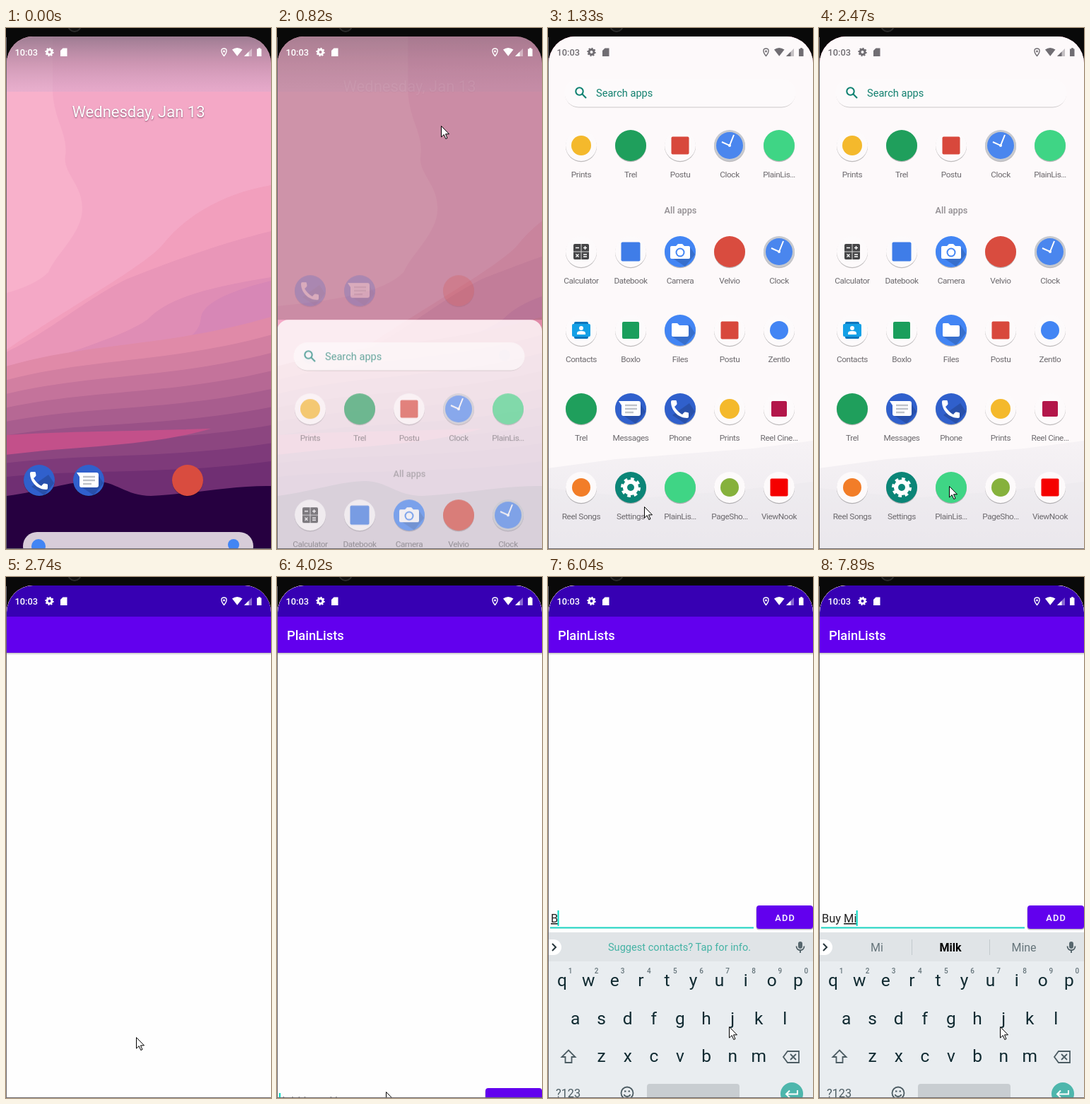
Write an HTML page that moves like this. It is 375 px wide and 736 px high and loops after 8000 ms.

```html
<!DOCTYPE html>
<html lang="en">
<head>
<meta charset="utf-8">
<title>Phone demo</title>
<style>
  html, body { margin: 0; width: 100%; height: 100%; overflow: hidden; background: #090909; }
  svg { display: block; width: 375px; height: 736px; font-family: Roboto, "Noto Sans", sans-serif; }
  .mid { text-anchor: middle; }
  .label { font-size: 11.8px; letter-spacing: -.4px; fill: #6c696d; text-anchor: middle; }
  .date { font-size: 22px; fill: #fff; text-shadow: 0 1px 2px rgba(60, 20, 50, .6); }
  .key { font-size: 24.5px; fill: #102a31; text-anchor: middle; }
  .num { font-size: 10px; font-weight: 500; fill: #65747a; text-anchor: middle; }
  .word { font-size: 16px; fill: #66757b; text-anchor: middle; }
  .word.best { font-weight: 700; fill: #000; }
  .line { fill: none; stroke: #4c5c63; stroke-width: 1.8; }
  #typing { text-decoration: underline 1px #777; }
</style>
</head>
<body>
<svg viewBox="0 0 375 736">
  <defs>
    <clipPath id="screen"><path d="M1 736V50A37 38 0 0 1 38 12H338A37 38 0 0 1 375 50V736Z"/></clipPath>
    <linearGradient id="dusk" x2="0" y2="1">
      <stop offset="0" stop-color="#8a7286" stop-opacity=".82"/>
      <stop offset=".5" stop-color="#b48aa6" stop-opacity=".6"/>
      <stop offset="1" stop-color="#d3abd0" stop-opacity=".42"/>
    </linearGradient>
    <linearGradient id="ground" x2="0" y2="1">
      <stop offset="0" stop-color="#f6f2f5"/>
      <stop offset="1" stop-color="#ebe8ed"/>
    </linearGradient>
  </defs>

  <circle cx="97" cy="-4" r="9" fill="#111" stroke="#2b2b2b" stroke-width="2"/>

  <g clip-path="url(#screen)">
    <rect y="12" width="375" height="724" fill="#f4a8c6"/>
    <g id="sky">
      <path fill="#f8b1cb" d="M-300 12H66V90C68 130 88 150 84 180C80 205 108 220 108 255C108 290 70 320 60 345C30 375 -40 385 -120 393H-300Z"/>
      <path fill="#f29fbd" d="M375 222C300 235 250 270 220 308C190 340 80 400 0 455L-150 530V736H375Z"/>
      <path fill="#e996b8" d="M375 287C300 305 220 335 170 355C110 385 60 430 0 458L-150 530V736H375Z"/>
      <path fill="#df8db5" d="M375 352C290 366 230 380 200 412C160 440 60 465 0 492L-150 540V736H375Z"/>
      <path fill="#d787b6" d="M375 357C330 368 280 385 276 408C274 430 262 445 200 452L375 430Z"/>
    </g>
    <g id="strata"></g>
    <path fill="#c3508a" d="M0 575C80 570 160 570 290 566C200 592 100 590 0 603Z"/>
    <path fill="#260040" d="M0 661C50 655 90 640 125 640C155 640 170 661 205 661C260 659 320 646 375 647V736H0Z"/>
    <rect id="shade" y="12" width="375" height="78" fill="url(#dusk)"/>
    <rect id="scrim" width="375"/>

    <text id="date" class="date mid" x="187.5" y="126">Wednesday, Jan 13</text>
    <g id="home">
      <rect x="24" y="712" width="326" height="40" rx="20" fill="#d8cdd9"/>
      <circle cx="46" cy="732" r="10" fill="#4285f4"/>
      <circle cx="322" cy="730" r="8" fill="#4285f4"/>
    </g>

    <rect id="panel" width="375" height="760" rx="16" fill="#fdf9fa"/>
    <g id="hills">
      <path fill="url(#ground)" d="M0 622L96 609L290 594L375 583V736H0Z"/>
      <path fill="#e9e6eb" opacity=".45" d="M0 650L130 664L250 655L375 641V736H0Z"/>
    </g>
    <g id="drawer">
      <rect x="24" y="73.4" width="326" height="39" rx="19.5" opacity=".2"/>
      <rect x="23.5" y="72" width="327" height="39.5" rx="19.5" fill="#fdfafb"/>
      <g fill="none" stroke="#0f8272" stroke-width="2.1"><circle cx="44.5" cy="89.5" r="5.2"/><path d="M48.3 93.3L54 99"/></g>
      <text x="68" y="97" font-size="14.6" fill="#12806f">Search apps</text>
      <text class="mid" x="187.5" y="261.5" font-size="12.7" font-weight="500" fill="#928e92">All apps</text>
    </g>

    <g id="app" clip-path="url(#screen)">
      <rect y="12" width="375" height="724" fill="#fefefe"/>
      <rect y="12" width="375" height="45" fill="#3700b3"/>
      <rect y="56" width="375" height="51" fill="#6200ee"/>
      <rect y="107" width="375" height="1" fill="#b4b0ba"/>
      <rect y="108" width="375" height="2" fill="#e9e8eb"/>
      <g id="content">
        <text x="14" y="89" font-size="18.3" font-weight="500" fill="#fff">PlainLists</text>
        <g id="row">
          <text id="hint" x="4" y="488" font-size="16.4" fill="#8c8c8c">Add Item Here</text>
          <text id="field" x="4" y="488" font-size="16.4" fill="#222"><tspan id="done"></tspan><tspan id="typing"></tspan></text>
          <rect id="caret" y="471" width="2" height="22" fill="#03dac5"/>
          <rect x="3" y="494.5" width="288" height="2" fill="#1bd3c1"/>
          <rect x="294.5" y="465.5" width="81" height="33" rx="4" opacity=".25"/>
          <rect x="295" y="464" width="80" height="33" rx="4" fill="#6200ee"/>
          <text class="mid" x="335.6" y="486" font-size="12.8" font-weight="500" letter-spacing="1.1" fill="#fff">ADD</text>
        </g>
      </g>
      <g id="keyboard">
        <rect y="502" width="375" height="260" fill="#e9edf0"/>
        <rect y="502" width="375" height="41" fill="#e0e4e7"/>
        <path fill="#fff" d="M0 512H8A11 11 0 0 1 8 534H0Z"/>
        <path d="M6 518L11 523L6 528" fill="none" stroke="#26363c" stroke-width="2"/>
        <text id="tip" class="mid" x="186" y="528" font-size="14.6" fill="#45b3a5">Suggest contacts? Tap for info.</text>
        <g id="words">
          <path d="M131.5 512V534M241.5 512V534" stroke="#c2c9cd"/>
          <text class="word" x="82" y="529"></text>
          <text class="word best" x="186" y="529"></text>
          <text class="word" x="290" y="529"></text>
        </g>
        <rect x="354" y="515" width="6" height="10" rx="3" fill="#57676e"/>
        <path class="line" d="M351.5 521.5C351.5 529 362.5 529 362.5 521.5M357 527V531"/>
        <g id="keys"></g>
        <path class="line" d="M29 668.5L38.5 678H33.5V686H24.5V678H19.5Z"/>
        <path class="line" d="M333 678L339 670H355V686H339ZM343 674L351 682M351 674L343 682"/>
        <text x="11" y="735" font-size="16.3" fill="#4c5c63">?123</text>
        <circle class="line" cx="112" cy="729" r="8.5"/>
        <path class="line" d="M107.5 731C109 735 115 735 116.5 731M108 726.5H110.5M113.5 726.5H116"/>
        <rect x="140" y="716" width="131" height="30" rx="4" fill="#c8cdd1"/>
        <circle cx="345" cy="730" r="16" fill="#4db6ac"/>
        <path d="M353 725V730.5H337.5M342 725.5L337 730.5L342 735.5" fill="none" stroke="#fff" stroke-width="2"/>
      </g>
    </g>

    <g id="status" fill="currentColor">
      <text x="12.5" y="39" font-size="12.8" font-weight="500">10:03</text>
      <g fill="none" stroke="currentColor">
        <circle cx="61.5" cy="34" r="3.5" stroke-width="3"/>
        <circle cx="61.5" cy="34" r="5.2" stroke-width="2" pathLength="16" stroke-dasharray="1"/>
        <path stroke-width="1.4" d="M308.5 39.5C303.5 33.5 304 29 308.5 29S313.5 33.5 308.5 39.5Z"/>
      </g>
      <circle cx="308.5" cy="33" r="1.4"/>
      <path d="M80.5 28.5H86.5V40H77V32Z"/>
      <path d="M320 30.5Q327 25.5 334.5 30.5L327.2 39.8Z"/>
      <path opacity=".4" d="M337 40L348 29V40Z"/>
      <path d="M337 40L343.5 33.5V40Z"/>
      <path d="M355 29.5H357V28.3H360V29.5H361.5V40H355Z"/>
    </g>
  </g>

  <path id="cursor" d="M.5 .5V16L4.2 12.6L6.8 18.5L9 17.5L6.5 11.8H11.5Z" fill="#fff" stroke="#000"/>
  <path d="M.5 13V736M0 735.5H375" stroke="#6d6a70"/>
</svg>

<script>
const LOOP = 8000;
const $ = id => document.getElementById(id);
const put = (id, markup) => $(id).insertAdjacentHTML("beforeend", markup);
const at = (x, y, markup) => `<g transform="translate(${x} ${y})">${markup}</g>`;

// Layered dusk bands, evenly spaced and darkening towards the ground.
const BANDS = 9;
for (let i = 0; i < BANDS; i++) {
  const left = 478 + 19.5 * i, right = 408 + 25.5 * i, mid = (left + right) / 2;
  const color = `color-mix(in srgb, #702f73 ${100 * i / (BANDS - 1)}%, #e08aa8)`;
  put("strata", `<path style="fill:${color}" d="M0 ${left}C120 ${mid} 230 ${mid + 8} 375 ${right}V736H0Z"/>`);
}

// App icons, drawn around their centre.
const disc = (color, r = 22) => `<circle r="${r}" fill="${color}"/>`;
const plate = color => `<circle cy="1.2" r="22" opacity=".25"/>` + disc(color);
const box = (color, w, h = w) =>
  `<rect x="${-w / 2}" y="${-h / 2}" width="${w}" height="${h}" rx="2" fill="${color}"/>`;
const white = d => `<path fill="#fff" d="${d}"/>`;
const strokes = (color, width, d) => `<path fill="none" stroke="${color}" stroke-width="${width}" d="${d}"/>`;
const cast = `<path opacity=".16" d="M13 -8L21 4L7 21L-11 9Z"/>`;
const PAPER = "#fdfafb", BLUE = "#4285f4", NAVY = "#3060cc", TEAL = "#0b8577";

const icons = {
  Prints: plate(PAPER) + disc("#f4b92c", 14),
  Trel: plate("#1f9f5c"),
  Postu: plate(PAPER) + box("#d8483c", 25),
  Clock: plate("#c6c9cf") + disc("#4a86ee", 19) + strokes("#fff", 2, "M6 -15L0 0L-11 -5") + disc("#fff", 2),
  "PlainLis…": plate("#3fd585"),
  Calculator: plate(PAPER) + box("#454547", 22) +
    strokes("#d5d5d5", 1, "M0 -11V11M-11 0H11") +
    strokes("#fff", 1.3, "M-8 -5.5H-3M3 -5.5H8M5.5 -8V-3M-7.5 3.5L-3.5 7.5M-3.5 3.5L-7.5 7.5M3 4H8M3 7H8"),
  Datebook: plate(PAPER) + box("#3f7de8", 27),
  Camera: plate(BLUE) + cast +
    white("M-12 -8H-6L-3 -11H3L6 -8H12Q14 -8 14 -6V8Q14 10 12 10H-12Q-14 10 -14 8V-6Q-14 -8 -12 -8Z") +
    at(0, 1, disc(BLUE, 6.5) + disc("#fff", 4.5)),
  Velvio: plate("#d94c3f"),
  Contacts: plate(PAPER) + box("#0b76bd", 20, 24) + box("#14a0e6", 26, 18) +
    white("M-6 6V4Q-6 1 0 1T6 4V6Z") + at(0, -3, disc("#fff", 3)),
  Boxlo: plate(PAPER) + box("#1a9e5c", 24),
  Files: plate(BLUE) + cast +
    white("M-11 -10H-4L-1 -7H10Q12 -7 12 -5V7Q12 9 10 9H-10Q-12 9 -12 7V-9Z"),
  Zentlo: plate(PAPER) + disc(BLUE, 13),
  Messages: plate(NAVY) + cast +
    white("M-17 -11H11Q14 -11 14 -8V7Q14 10 11 10H-10Q-13 10 -13 7V-5Z") +
    strokes("#bfc3c9", 2.5, "M-8 -5H9M-8 0H9M-8 5H4"),
  Phone: plate(NAVY) + cast +
    white("M-11 -12H-6Q-5 -12 -4.5 -7Q-4.5 -6 -8 -3Q-4 4 3 8Q6 4 7 4.5Q12 5 12 6V11Q12 13 10 13C-3 13 -13 2 -13 -10Q-13 -12 -11 -12Z"),
  "Reel Cine…": plate(PAPER) + box("#b3164a", 22),
  "Reel Songs": plate(PAPER) + disc("#f27d28", 13),
  Settings: plate(TEAL) + disc("#fff", 11) +
    `<circle r="11.5" fill="none" stroke="#fff" stroke-width="5" pathLength="16" stroke-dasharray="1"/>` + disc(TEAL, 5),
  "PageSho…": plate(PAPER) + disc("#86b13c", 13),
  ViewNook: plate(PAPER) + box("#f50000", 25),
};

const column = i => 47 + 70 * i;
const grid = [
  ["Prints", "Trel", "Postu", "Clock", "PlainLis…"],
  ["Calculator", "Datebook", "Camera", "Velvio", "Clock"],
  ["Contacts", "Boxlo", "Files", "Postu", "Zentlo"],
  ["Trel", "Messages", "Phone", "Prints", "Reel Cine…"],
  ["Reel Songs", "Settings", "PlainLis…", "PageSho…", "ViewNook"],
];
grid.forEach((names, r) => names.forEach((name, i) =>
  put("drawer", at(column(i), r ? 205 + 111 * r : 166, icons[name] + `<text class="label" y="44.5">${name}</text>`))));
["Phone", "Messages", , "Velvio"].forEach((name, i) => put("home", at(column(i), 639, icons[name])));

const PITCH = 37.1;
["qwertyuiop", "asdfghjkl", "zxcvbnm"].forEach((letters, r) => [...letters].forEach((c, i) => {
  const x = 20 + PITCH * (i + [0, .5, 1.5][r]), y = 578 + 53.5 * r;
  put("keys", `<text class="key" x="${x}" y="${y}">${c}</text>`);
  if (r === 0) put("keys", `<text class="num" x="${x + 11.5}" y="${y - 18.5}">${(i + 1) % 10}</text>`);
}));

// Timing helpers; motion is sampled on a coarse beat, as in a screen recording.
const BEAT = 125, PHASE = 65;
const sample = t => PHASE + BEAT * Math.floor((t - PHASE) / BEAT);
const ramp = (t, from, to) => Math.max(0, Math.min(1, (t - from) / (to - from)));
const smooth = u => u * u * (3 - 2 * u);

// Pointer stops: time, x, y.
const stops = [
  [300, 181, 671], [540, 172, 647], [815, 232, 138], [940, 226, 152], [1315, 136, 676],
  [1690, 167, 626], [2140, 175, 640], [2440, 184, 647], [2690, 184, 650], [3690, 145, 724],
  [3900, 154, 727], [4190, 154, 727], [4900, 256, 635],
];
function pointer(t) {
  const i = Math.max(0, stops.findLastIndex(s => s[0] <= t));
  const a = stops[i], b = stops[i + 1] || a;
  const u = smooth(ramp(t, a[0], b[0] + 1));
  return [a[1] + (b[1] - a[1]) * u, a[2] + (b[2] - a[2]) * u];
}

const MESSAGE = "Buy Mi";
const presses = [6040, 6440, 6590, 7110, 7600, 7890];
const guesses = { "Buy ": ["a", "it", "the"], "Buy M": ["M", "Me", "My"], "Buy Mi": ["Mi", "Milk", "Mine"] };

const fade = (id, a) => $(id).setAttribute("opacity", Math.max(0, Math.min(1, a)));
const move = (id, x, y, s = 1) => $(id).setAttribute("transform", `translate(${x} ${y}) scale(${s})`);

function drawLauncher(beat) {
  const lift = 640 - 636 * ramp(beat, 565, 940) ** 2.133 - 4 * ramp(beat, 940, 1315);
  const open = 1 - lift / 640, top = 12 + (lift - 4) * 1.087;
  move("sky", 285 * open, 0);
  fade("shade", 1 - 1.2 * open);
  $("scrim").setAttribute("height", Math.max(0, top));
  fade("scrim", .4 * open);
  move("home", 0, lift - 640);
  fade("home", 1 - 1.85 * open);
  move("date", 0, -86 * open);
  fade("date", 1 - 2.25 * open);
  $("panel").setAttribute("y", top);
  fade("panel", 2 * open);
  fade("hills", 50 * open - 48);
  move("drawer", 0, lift);
  fade("drawer", 1.5 * open);
}

function drawApp(t, beat) {
  const shrink = .16 * (1 - ramp(beat, 2440, 2690));
  fade("app", t >= 2590);
  move("app", 187.5 * shrink, 900 * shrink, 1 - shrink);
  fade("content", t >= 2870);
  move("row", 0, t < 4290 ? 258 : 0);
  fade("keyboard", t >= 4170);
  move("keyboard", 0, 150 * (1 - ramp(beat, 4065, 4565)) ** 2);
}

function drawTyping(t) {
  const typed = MESSAGE.slice(0, presses.filter(p => p <= t).length);
  const cut = typed.lastIndexOf(" ") + 1;
  $("done").textContent = typed.slice(0, cut).replace(" ", "\u00a0");
  $("typing").textContent = typed.slice(cut);
  fade("hint", !typed);
  $("caret").setAttribute("x", typed ? 3.3 + $("field").getComputedTextLength() : 3);
  const blink = t >= 3900 && Math.floor((t - 3900) / 500) % 2 === 0;
  fade("caret", typed || blink ? 1 : 0);

  const words = guesses[typed];
  fade("tip", !words);
  fade("words", !!words);
  document.querySelectorAll(".word").forEach((el, i) => el.textContent = words ? words[i] : "");
}

function draw(t) {
  const beat = sample(t);
  drawLauncher(beat);
  drawApp(t, beat);
  drawTyping(t);
  $("status").setAttribute("color", t >= 1060 && t < 2740 ? "#706d72" : "#fff");
  fade("cursor", t >= 300);
  move("cursor", ...pointer(beat));
}

const start = performance.now();
function tick() {
  draw((performance.now() - start) % LOOP);
  requestAnimationFrame(tick);
}
tick();
</script>
</body>
</html>
```
